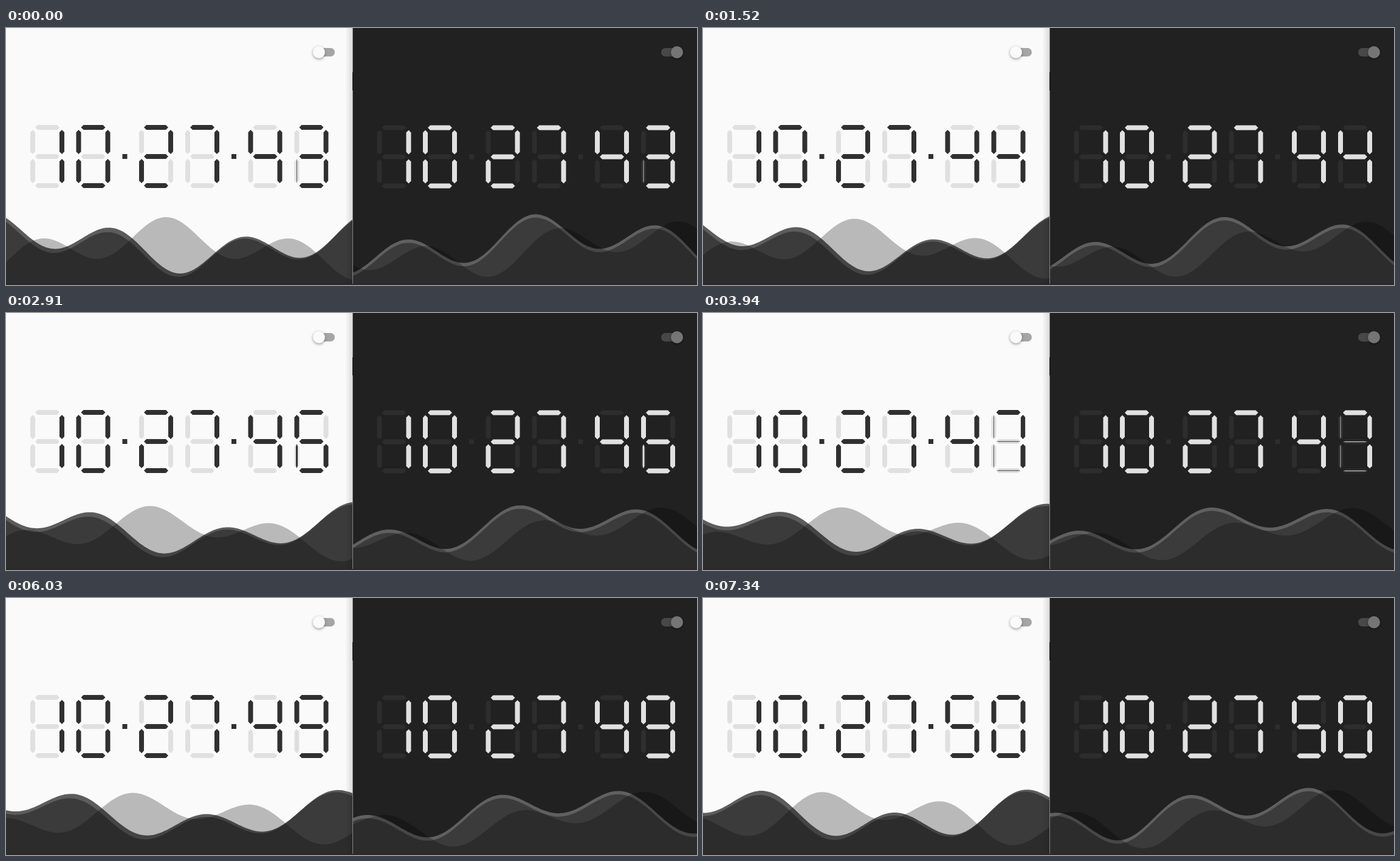
An HTML page with a canvas for the animation above (7.37 s loop, 1137 by 424 pixels).

```html
<!DOCTYPE html>
<html>
<head>
<meta charset="utf-8">
<style>
  html, body { margin: 0; width: 100%; height: 100%; overflow: hidden; background: #212121; }
  canvas { display: block; }
</style>
</head>
<body>
<canvas width="1137" height="424"></canvas>
<script>
const ctx = document.querySelector('canvas').getContext('2d');
const LOOP = 7.37, SPLIT = 570.5, H = 424;

// seconds at which the clock shows 10:27:43, :44, ...
const TICKS = [-0.17, 0.8, 1.83, 2.86, 3.77, 4.8, 5.8, 6.76];
const WIPE = 0.25;
const DIGIT_X = [40, 115.5, 219, 295, 398.5, 474.5];
const LIT = ['abcdef', 'bc', 'abdeg', 'abcdg', 'bcfg', 'acdfg', 'acdefg', 'abc', 'abcdefg', 'abcdfg'];
// centre of each segment, and whether it stands upright
const SEGMENTS = {
  a: [28, 4, 0], g: [28, 52, 0], d: [28, 100, 0],
  f: [4, 28, 1], b: [52, 28, 1], e: [4, 76, 1], c: [52, 76, 1]
};

// level: mean height; a, b: crests of the short and long swell; drift: px/s of the long one
const LIGHT = {
  x: 0, width: 570, top: 160, bg: '#fafafa', on: '#303030', off: '#e0e0e0', dot: '#303030',
  waves: [
    { color: '#5c5c5c', level: 354.3, a: 178.8, b: 4, drift: -1.1, extra: 0 },
    { color: '#3b3b3b', level: 359.3, a: 176.5, b: -8, drift: -1.1, extra: 0 },
    { color: 'rgba(0,0,0,.262)', level: 364, a: 263.3, b: 263, drift: -1.1, extra: 0 }
  ]
};
const DARK = {
  x: SPLIT, width: 567, top: 160.5, bg: '#212121', on: '#e1e1e1', off: '#2d2d2d', dot: '#2d2d2d',
  waves: [
    { color: '#606060', level: 356.6, a: 296.5, b: 353.5, drift: 0.6, extra: 0.8 },
    { color: '#3b3b3b', level: 362.1, a: 296.5, b: 353.5, drift: 0.6, extra: 0.8 },
    { color: 'rgba(0,0,0,.262)', level: 364.8, a: 123.3, b: 465.5, drift: -0.3, extra: 0 }
  ]
};

function rect(x, y, w, h, color) {
  ctx.fillStyle = color;
  ctx.fillRect(x, y, w, h);
}

function segment(x, y, name, color, thickness = 1) {
  const [cx, cy, upright] = SEGMENTS[name], r = 4 * thickness;
  ctx.save();
  ctx.translate(x + cx, y + cy);
  if (upright) ctx.rotate(Math.PI / 2);
  ctx.beginPath();
  for (const [px, py] of [[-20, 0], [-16, -r], [16, -r], [20, 0], [16, r], [-16, r]]) ctx.lineTo(px, py);
  ctx.fillStyle = color;
  ctx.fill();
  ctx.restore();
}

function digit(x, y, from, to, progress, theme) {
  for (const name in SEGMENTS) {
    const was = +LIT[from].includes(name), is = +LIT[to].includes(name);
    const amount = was + (is - was) * progress;
    if (amount < 1) segment(x, y, name, theme.off);
    if (amount > 0) segment(x, y, name, theme.on, amount);
  }
}

function clock(theme, t) {
  const step = TICKS.filter(tick => tick <= t).length - 1;
  const p = Math.min(1, (t - TICKS[step]) / WIPE);
  const progress = 1 - (1 - p) ** 2;
  const now = String(102743 + step), before = String(102742 + step);
  DIGIT_X.forEach((x, i) => digit(theme.x + x, theme.top, before[i], now[i], progress, theme));
  for (const x of [191.5, 371]) rect(theme.x + x, theme.top + 48, 8, 8, theme.dot);
}

function wave(theme, w, t) {
  const short = 24.2 + w.extra + 4 * Math.cos(0.6 * t + 0.33);
  ctx.beginPath();
  ctx.moveTo(theme.x, H);
  for (let x = 0; x <= theme.width; x += 3) {
    const y = w.level - short * Math.cos(0.03 * (x - w.a) + 0.3 * t)
      - 24 * Math.cos(0.01 * (x - w.b - w.drift * t));
    ctx.lineTo(theme.x + x, y);
  }
  ctx.lineTo(theme.x + theme.width, H);
  ctx.fillStyle = w.color;
  ctx.fill();
}

function toggle(x, knobX, track, knob) {
  ctx.beginPath();
  ctx.roundRect(x, 33, 35, 14, 7);
  ctx.fillStyle = track;
  ctx.fill();
  ctx.save();
  ctx.shadowColor = 'rgba(0,0,0,.4)';
  ctx.shadowBlur = 4;
  ctx.shadowOffsetY = 1.5;
  ctx.beginPath();
  ctx.arc(knobX, 40, 10, 0, 7);
  ctx.fillStyle = knob;
  ctx.fill();
  ctx.restore();
}

function panel(theme, t) {
  rect(theme.x, 0, theme.width, H, theme.bg);
  clock(theme, t);
  for (const w of theme.waves) wave(theme, w, t);
}

function draw(t) {
  panel(LIGHT, t);
  const shade = ctx.createLinearGradient(558, 0, 570, 0);
  shade.addColorStop(0, 'rgba(0,0,0,0)');
  shade.addColorStop(1, 'rgba(0,0,0,.12)');
  rect(558, 0, 12, H, shade);
  panel(DARK, t);
  rect(570, 0, 1, H, '#858585');
  rect(570, 73, 1, 30, '#222');
  rect(0, 422, 1137, 2, '#2e2629');
  toggle(506, 515, '#a5a5a5', '#fafafa');
  toggle(1078, 1104, '#484848', '#757575');
}

const start = performance.now();
function frame() {
  draw((performance.now() - start) / 1000 % LOOP);
  requestAnimationFrame(frame);
}
frame();
</script>
</body>
</html>
```
